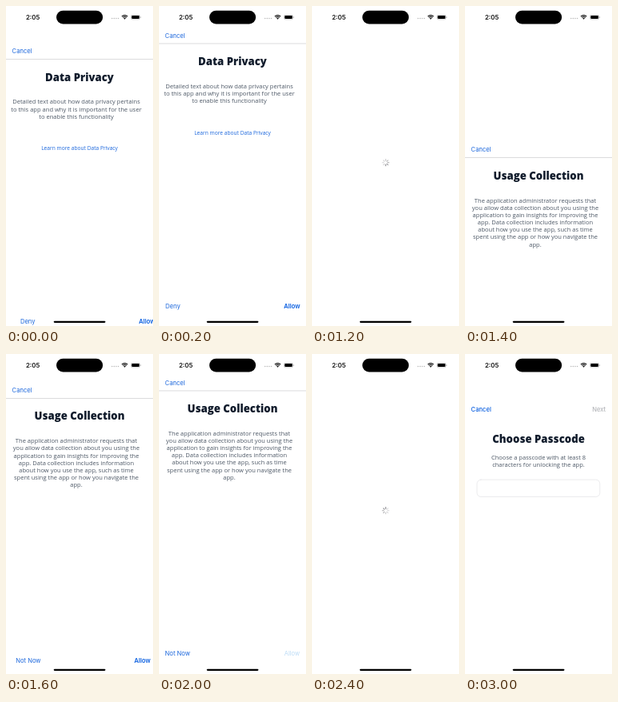
Animation of 184 by 400 pixels, one loop 3200 ms. Source, as an HTML page with a canvas:

```html
<!DOCTYPE html>
<html lang="en">
<head>
<meta charset="utf-8">
<title>Onboarding flow</title>
<style>
  html, body { margin: 0; width: 184px; height: 400px; overflow: hidden; background: #fff; }
  canvas { display: block; width: 184px; height: 400px; }
</style>
</head>
<body>
<canvas id="stage"></canvas>
<script>
const W = 184, H = 400, LOOP = 3200, STEP = 200;
const UI = 'Inter, "Liberation Sans", sans-serif';
const COPY = '"Open Sans", "Noto Sans", sans-serif';
const BLUE = '#1a66dc', STRONG = '#0a5fe0', FADED = '#bddcf6';
const INK = '#111c2c', BODY = '#4d5866';

const canvas = document.getElementById('stage');
const ctx = canvas.getContext('2d');
const ratio = window.devicePixelRatio || 1;
canvas.width = W * ratio;
canvas.height = H * ratio;

// Times in ms: when each sheet starts rising and when it starts to drop.
const sheets = [
  {
    rise: -272, drop: 623, dim: 600, title: 'Data Privacy', deny: 'Deny',
    copy: ['Detailed text about how data privacy pertains',
      'to this app and why it is important for the user',
      'to enable this functionality'],
    link: 'Learn more about Data Privacy'
  },
  {
    rise: 1274, drop: 2147, dim: 2000, title: 'Usage Collection', deny: 'Not Now',
    copy: ['The application administrator requests that',
      'you allow data collection about you using the',
      'application to gain insights for improving the',
      'app. Data collection includes information',
      'about how you use the app, such as time',
      'spent using the app or how you navigate the',
      'app.']
  },
  {
    rise: 2763, drop: Infinity, passcode: true, title: 'Choose Passcode',
    copy: ['Choose a passcode with at least 8',
      'characters for unlocking the app.']
  }
];

// Critically damped spring: 1 at the start, settling to 0.
function spring(ms) {
  const a = Math.max(0, ms) * 0.0173;
  return (1 + a) * Math.exp(-a);
}

function sheetOffset(s, t) {
  return t < s.drop ? H * spring(t - s.rise) : H * (1 - spring(t - s.drop));
}

function text(str, x, y, size, color, family, weight = 400, align = 'left') {
  ctx.font = `${weight} ${size}px ${family}`;
  ctx.fillStyle = color;
  ctx.textAlign = align;
  ctx.fillText(str, x, y);
}

function pill(x, y, w, h, r, color) {
  ctx.fillStyle = color;
  ctx.beginPath();
  ctx.roundRect(x, y, w, h, r);
  ctx.fill();
}

function drawSpinner(t) {
  const head = Math.floor(t / 100) % 8;
  ctx.lineWidth = 1.1;
  ctx.lineCap = 'round';
  for (let i = 0; i < 8; i++) {
    const age = (head - i + 8) % 8;
    const a = i * Math.PI / 4 - Math.PI / 2;
    const c = Math.cos(a), s = Math.sin(a);
    ctx.strokeStyle = `rgba(60,60,67,${Math.max(0.22, 0.62 - age * 0.08)})`;
    ctx.beginPath();
    ctx.moveTo(92.2 + c * 2.3, 195.7 + s * 2.3);
    ctx.lineTo(92.2 + c * 4.1, 195.7 + s * 4.1);
    ctx.stroke();
  }
}

function drawSheet(s, t) {
  const off = sheetOffset(s, t);
  if (t < s.rise || off > H - 2) return;
  ctx.save();
  ctx.translate(0, off);
  ctx.fillStyle = '#fff';
  ctx.fillRect(0, 0, W, H);
  text('Cancel', 7.6, 38.6, 7.6, s.passcode ? STRONG : BLUE, UI, s.passcode ? 500 : 400);

  const top = s.passcode ? 77 : 73;
  text(s.title, W / 2, top, 13.2, INK, COPY, 800, 'center');
  const first = s.passcode ? 98.2 : 101.8;
  s.copy.forEach((line, i) =>
    text(line, 88 + (s.passcode ? 4 : 0), first + i * 9.17, 7.55, BODY, COPY, 400, 'center'));
  if (s.link) text(s.link, W / 2, 159.5, 6.65, BLUE, COPY, 400, 'center');

  if (s.passcode) {
    text('Next', 176.2, 38.6, 7.6, '#b3b5b9', UI, 500, 'right');
    ctx.strokeStyle = '#e3e3e6';
    ctx.lineWidth = 0.7;
    ctx.beginPath();
    ctx.roundRect(15, 123.3, 153.8, 21.4, 5);
    ctx.stroke();
  } else {
    ctx.fillStyle = '#b8b8bb';
    ctx.fillRect(0, 45.7, W, 0.5);
    // The toolbar lags sideways while the sheet travels.
    const x = off / 2, dim = t >= s.dim;
    text(s.deny, 7.6 + x, 376.6, 7.6, BLUE, UI);
    text('Allow', 176.2 + x, 376.6, 7.6, dim ? FADED : STRONG, UI, dim ? 400 : 600, 'right');
  }
  ctx.restore();
}

function drawWifi(x, y) {
  ctx.strokeStyle = '#000';
  ctx.lineCap = 'butt';
  ctx.lineWidth = 1.1;
  for (const r of [5.2, 3.3]) {
    ctx.beginPath();
    ctx.arc(x, y, r, -Math.PI * 0.75, -Math.PI * 0.25);
    ctx.stroke();
  }
  ctx.fillStyle = '#000';
  ctx.beginPath();
  ctx.moveTo(x, y);
  ctx.arc(x, y, 1.9, -Math.PI * 0.75, -Math.PI * 0.25);
  ctx.fill();
}

function drawChrome() {
  text('2:05', 25, 16.8, 7.8, '#111', UI, 600);
  pill(63, 5.7, 58.2, 16.8, 8.4, '#000');
  for (let i = 0; i < 4; i++) pill(132 + i * 2.6, 14.8, 1.5, 1.5, 0.75, '#b5b5b5');
  drawWifi(148.6, 16.8);
  ctx.strokeStyle = '#a0a0a0';
  ctx.lineWidth = 0.5;
  ctx.beginPath();
  ctx.roundRect(156.5, 11.2, 11.2, 5.6, 1.8);
  ctx.stroke();
  pill(157.3, 12, 9.6, 4, 1.1, '#000');
  pill(168.3, 13.1, 0.7, 1.9, 0.35, '#a0a0a0');
  pill(59.7, 393.7, 64.8, 2.3, 1.15, '#000');
}

function draw(now) {
  const t = Math.floor((now % LOOP) / STEP) * STEP;
  ctx.setTransform(ratio, 0, 0, ratio, 0, 0);
  ctx.fillStyle = '#fff';
  ctx.fillRect(0, 0, W, H);
  drawSpinner(t);
  sheets.forEach(s => drawSheet(s, t));
  drawChrome();
}

let start = null;
function tick(now) {
  if (start === null) start = now;
  draw(now - start);
  requestAnimationFrame(tick);
}
draw(0);
requestAnimationFrame(tick);
</script>
</body>
</html>
```
